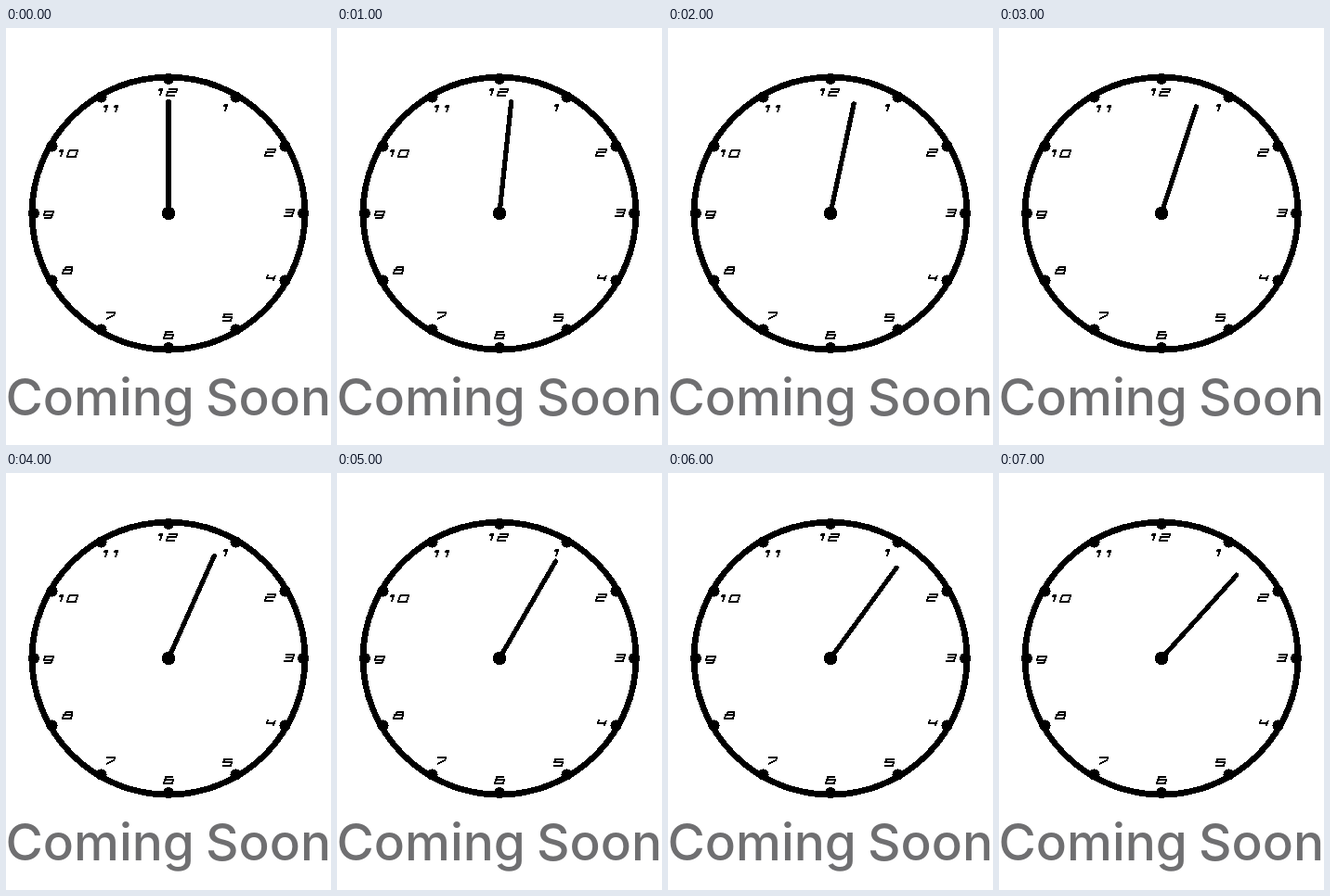
Recreate the animation shown at these times as an HTML page with a canvas. Size 350 px wide and 450 px high, loop 8 s.

```html
<!DOCTYPE html>
<html lang="en">
<head>
<meta charset="utf-8">
<title>Coming Soon</title>
<style>
  html, body { margin: 0; width: 100%; height: 100%; overflow: hidden; background: #fff; }
  canvas { display: block; }
</style>
</head>
<body>
<canvas id="stage" width="350" height="450"></canvas>
<script>
const ctx = document.getElementById('stage').getContext('2d', { willReadFrequently: true });
const WIDTH = 350, HEIGHT = 450, CX = 175, CY = 200, LOOP = 8000;

// Squared digits on a 9 x 7 grid: strokes split by spaces, points as "xy".
const GLYPHS = {
  0: '00,90,97,07,00',
  1: '01,40,47',
  2: '00,90,93,03,07,97',
  3: '00,90,97,07 13,93',
  4: '00,04,94 81,87',
  5: '90,00,03,93,97,07',
  6: '80,00,07,97,93,03',
  7: '00,90,93,27',
  8: '10,80,83,13,10 13,03,07,97,93,83',
  9: '97,90,00,04,94 97,17'
};

// Number, left edge and top edge of each label.
const LABELS = [
  ['12', 162, 66], ['1', 232, 83], ['2', 279, 131], ['3', 299, 196],
  ['4', 280, 266], ['5', 233, 309], ['6', 170, 328], ['7', 106, 307],
  ['8', 61, 258], ['9', 40, 198], ['10', 55, 132], ['11', 103, 84]
];

function disc(x, y, r) {
  ctx.beginPath();
  ctx.arc(x, y, r, 0, Math.PI * 2);
  ctx.fill();
}

function polar(angle, r) {
  return [CX + r * Math.sin(angle), CY - r * Math.cos(angle)];
}

function drawDigit(digit, x, y) {
  ctx.beginPath();
  for (const stroke of GLYPHS[digit].split(' ')) {
    stroke.split(',').forEach(([gx, gy], i) => {
      const px = x + +gx + (7 - gy) * 0.3, py = y + +gy;
      i ? ctx.lineTo(px, py) : ctx.moveTo(px, py);
    });
  }
  ctx.stroke();
}

function drawLabel([text, x, y]) {
  for (const digit of text) {
    drawDigit(digit, x, y);
    x += 11;
  }
}

function drawFace() {
  for (let hour = 0; hour < 12; hour++) disc(...polar(hour * Math.PI / 6, 145), 6);

  ctx.lineWidth = 6.5;
  ctx.beginPath();
  ctx.arc(CX, CY, 147, 0, Math.PI * 2);
  ctx.stroke();

  ctx.lineWidth = 1.8;
  ctx.lineJoin = 'round';
  ctx.lineCap = 'butt';
  LABELS.forEach(drawLabel);
}

function drawHand(seconds) {
  ctx.lineWidth = 5;
  ctx.lineCap = 'round';
  ctx.beginPath();
  ctx.moveTo(CX, CY);
  ctx.lineTo(...polar(seconds * Math.PI / 30, 121));
  ctx.stroke();
  disc(CX, CY, 7.2);
}

// Turns smoothed edges into pure black and white.
function hardenEdges() {
  const image = ctx.getImageData(0, 0, WIDTH, HEIGHT), { data } = image;
  for (let i = 0; i < data.length; i += 4) {
    data[i] = data[i + 1] = data[i + 2] = data[i] < 155 ? 0 : 255;
  }
  ctx.putImageData(image, 0, 0);
}

function drawCaption() {
  ctx.fillStyle = '#6f6f71';
  ctx.font = '500 55px Inter, sans-serif';
  ctx.textAlign = 'left';
  ctx.fillText('Coming', -0.5, 418);
  ctx.textAlign = 'right';
  ctx.fillText('Soon', 350, 418);
}

function render(seconds) {
  ctx.fillStyle = '#fff';
  ctx.fillRect(0, 0, WIDTH, HEIGHT);
  ctx.fillStyle = ctx.strokeStyle = '#000';
  drawFace();
  drawHand(seconds);
  hardenEdges();
  drawCaption();
}

const start = performance.now();
function tick() {
  render(Math.floor(((performance.now() - start) % LOOP) / 1000));
  requestAnimationFrame(tick);
}
tick();
</script>
</body>
</html>
```
